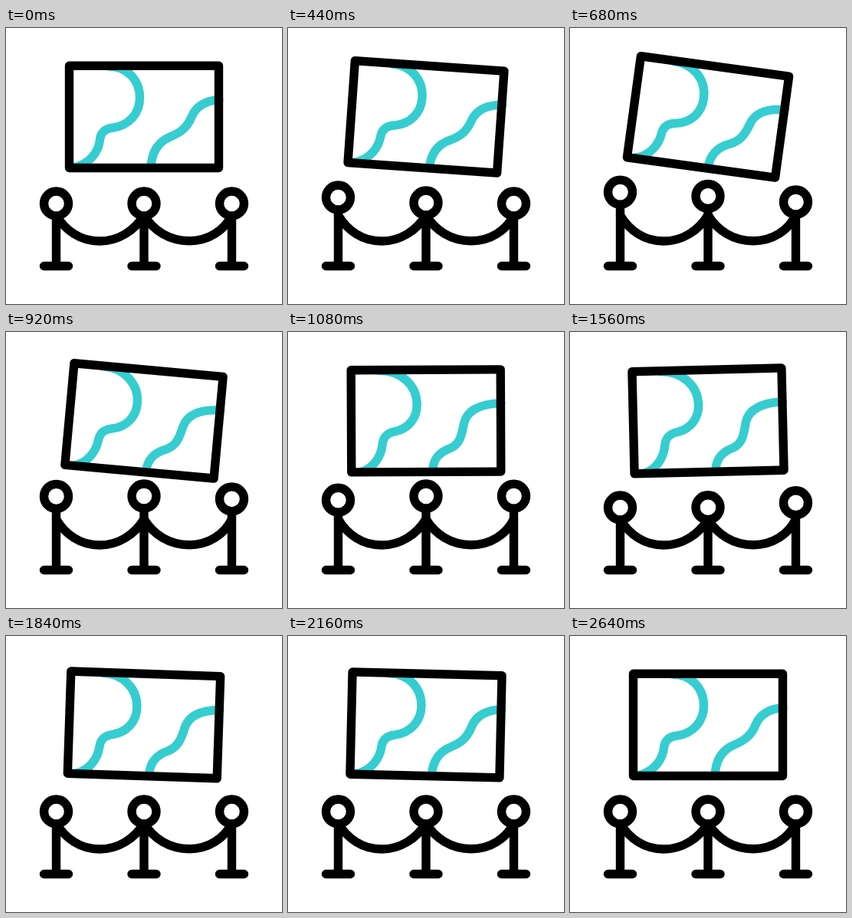
An HTML page that plays this animation: 360 by 360 pixels, repeating every 2.68 s.

```html
<!DOCTYPE html>
<html lang="en">
<head>
<meta charset="utf-8">
<title>Gallery picture</title>
<style>
  html, body { margin: 0; height: 100%; overflow: hidden; background: #fff; }
  svg { display: block; width: 100vw; height: 100vh; }
  svg * { fill: none; stroke-width: 11.4; stroke-linecap: round; stroke-linejoin: round; }
  svg circle { fill: #fff; }
  .ink { stroke: #000; }
  .paint { stroke: #35cdd0; }
</style>
</head>
<body>
<svg viewBox="0 0 360 360">
  <g id="picture">
    <path class="paint"/>
    <path class="paint"/>
    <rect class="ink" x="82.5" y="49.3" width="195" height="133.2"/>
  </g>
  <path class="ink" d="M65.5 244C77 264 97 278 122 278S168 264 180 244C192 264 213 277.7 239 277.7C264 277.7 285 264 294.5 244"/>
  <g id="posts" class="ink"></g>
</svg>
<script>
const LOOP = 2680;
const POST_DELAY = 200;
const postXs = [65.5, 180, 294.5];

// Keyframes: [time in ms, value]
const swing = [[130, 0], [750, 8], [1282, -4], [1885, 2], [2600, 0]];
const lift = [[150, 0], [710, 15], [865, 15], [1400, 0]];
const morph = [[120, 0], [1240, 1], [1480, 1], [2420, 0]];

// Each stroke flows between two shapes
const strokes = [
  ["M134 50C158 50 174.5 68 174.5 91C174.5 112 160 127 140 130C128 131 123 138 122.5 146C121 160 110 178 88 182",
   "M118 50C148 50 168 70 168 95C168 112 157 126 140 129.5C127.5 132 124 138 123 147C121.5 160 113 177 96 182"],
  ["M278 93.5C258 95 247 104 242 116C236 131 226 137 214 142C200 148 190 160 189 182",
   "M278 93C251 94 233 102 229 119C226 134 225 146 212 152C198 157 188.5 165 188.5 182"]
];

const NUMBER = /[\d.]+/g;
const ease = p => (1 - Math.cos(Math.PI * p)) / 2;
const mix = (a, b, p) => a + (b - a) * p;

function valueAt(keys, t) {
  if (t <= keys[0][0]) return keys[0][1];
  for (let i = 1; i < keys.length; i++) {
    const [t0, v0] = keys[i - 1], [t1, v1] = keys[i];
    if (t < t1) return mix(v0, v1, ease((t - t0) / (t1 - t0)));
  }
  return keys[keys.length - 1][1];
}

function mixPaths([from, to], p) {
  const ends = to.match(NUMBER);
  let i = 0;
  return from.replace(NUMBER, n => mix(+n, +ends[i++], p).toFixed(2));
}

const picture = document.getElementById("picture");
const paints = picture.querySelectorAll(".paint");
const posts = document.getElementById("posts");
posts.innerHTML = postXs.map(x => `<path/><circle cx="${x}" r="16"/>`).join("");
const heads = posts.querySelectorAll("circle");
const stems = posts.querySelectorAll("path");

function draw(now) {
  const t = now % LOOP;
  picture.setAttribute("transform", `rotate(${valueAt(swing, t)} 180 116)`);
  const p = valueAt(morph, t);
  strokes.forEach((pair, i) => paints[i].setAttribute("d", mixPaths(pair, p)));
  postXs.forEach((x, i) => {
    const y = 229 - valueAt(lift, t - i * POST_DELAY);
    heads[i].setAttribute("cy", y);
    stems[i].setAttribute("d", `M${x} ${y + 16}V310.5M${x - 16} 310.5h32`);
  });
}

const start = performance.now();
function tick() {
  draw(performance.now() - start);
  requestAnimationFrame(tick);
}
tick();
</script>
</body>
</html>
```
